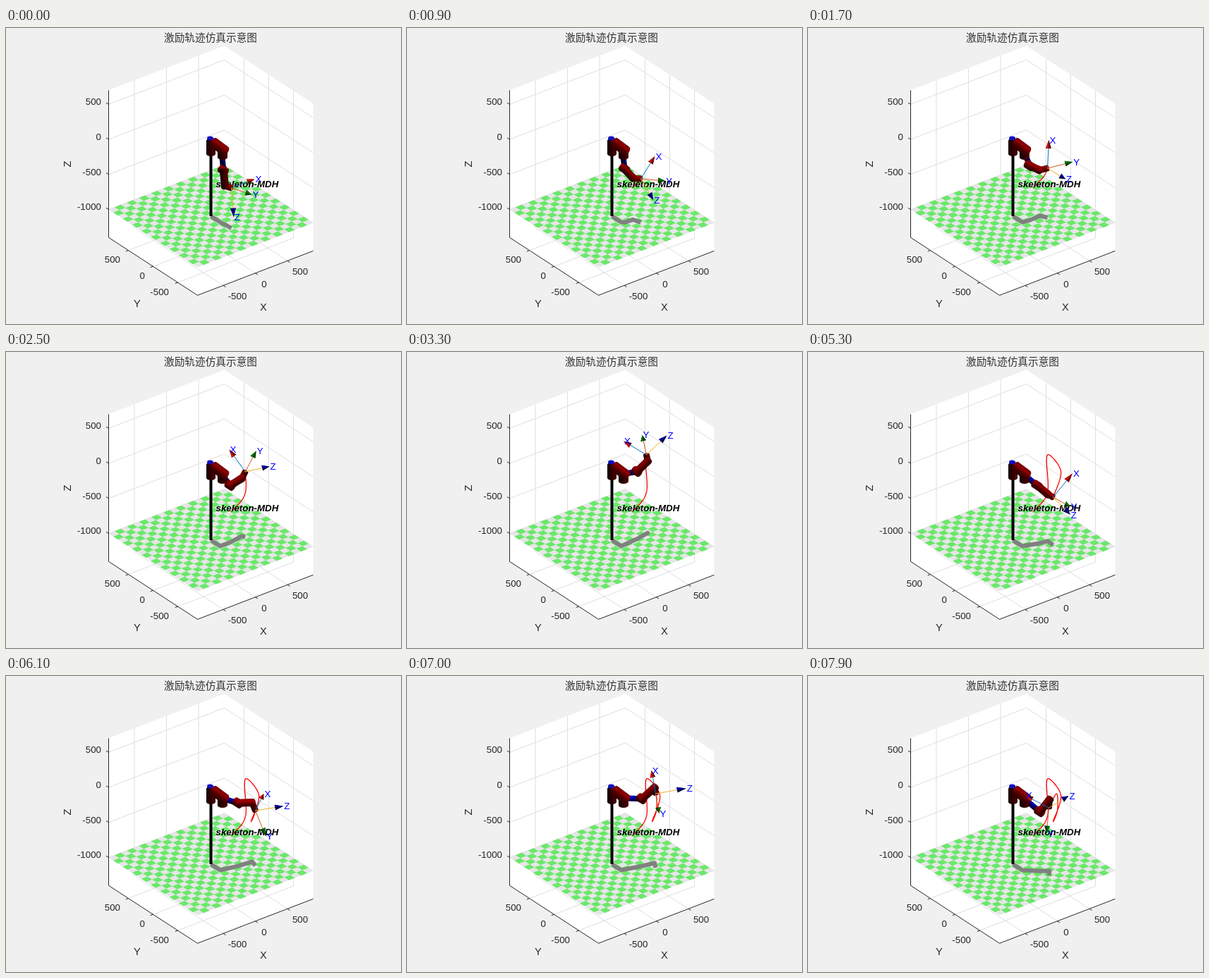
These frames come from a looping animation (560 by 420 pixels, 8000 ms). An HTML page with a canvas:

```html
<!DOCTYPE html>
<html lang="zh">
<head>
<meta charset="utf-8">
<title>Arm simulation</title>
<style>
  html, body { margin: 0; width: 100%; height: 100%; overflow: hidden; background: #f0f0f0; }
  canvas, svg { position: absolute; left: 0; top: 0; width: 560px; height: 420px; }
  text { font: 13.33px "Liberation Sans", Arial, sans-serif; fill: #262626; text-anchor: middle; }
  .end text { text-anchor: end; }
  .name text { font-size: 14.67px; }
  .name .title { font: 300 14.67px "Noto Sans CJK SC", "Noto Sans CJK", sans-serif; fill: #333; }
</style>
</head>
<body>
<canvas id="stage" width="560" height="420"></canvas>
<svg viewBox="0 0 560 420">
  <g class="name">
    <text class="title" x="290" y="19">激励轨迹仿真示意图</text>
    <text x="365" y="401">X</text>
    <text x="186" y="396">Y</text>
    <text transform="translate(92 193) rotate(-90)">Z</text>
  </g>
  <g class="end">
    <text x="135" y="109">500</text><text x="135" y="159">0</text>
    <text x="135" y="209">-500</text><text x="135" y="258">-1000</text>
    <text x="162" y="333">500</text><text x="197" y="356">0</text><text x="231" y="379">-500</text>
  </g>
  <text x="328" y="385">-500</text><text x="366" y="368">0</text><text x="417" y="350">500</text>
</svg>
<script>
const LOOP = 8000, STEP = 100;
const R = 900, LOW = -1400, HIGH = 700, FLOOR = -1000, TILES = 19;
const SHOULDER = [0, -215, 40], UPPER = 280, FORE = 210, TOOL = 120, AXIS = 44;
const ctx = document.getElementById('stage').getContext('2d');

// time, tip position, then tool heading, tilt and roll in degrees as the camera sees them
const poses = [
  [0, 20, -389, -427, -18, 46, -150],
  [1700, 317, -288, -296, 14, 33, -119],
  [3300, 423, -149, 136, 102, 49, -141],
  [4200, 480, -347, -25, 52, 41, -141],
  [5300, 319, -399, -317, -29, 51, -103],
  [6100, 414, -362, -216, -68, 27, -27],
  [7000, 375, -398, 55, -80, 50, 0],
  [7900, 182, -491, -35, -95, 33, 53]
];

// cubic Hermite through the keys
function at(keys, t) {
  const last = keys.length - 1;
  let i = 0;
  while (i < last - 1 && t >= keys[i + 1][0]) i++;
  const a = keys[i], b = keys[i + 1], span = b[0] - a[0];
  const u = Math.min(1, (t - a[0]) / span), v = 1 - u;
  const before = keys[Math.max(0, i - 1)], after = keys[Math.min(last, i + 2)];
  return a.slice(1).map((p, n) => {
    const k = n + 1, q = b[k];
    const m0 = (q - before[k]) / (b[0] - before[0]) * span;
    const m1 = (after[k] - p) / (after[0] - a[0]) * span;
    return p * v * v * (1 + 2 * u) + m0 * u * v * v + q * u * u * (3 - 2 * u) - m1 * u * u * v;
  });
}

// p + q * k
const add = (p, q, k = 1) => p.map((c, i) => c + q[i] * k);
const size = v => Math.hypot(...v) || 1;

const project = ([x, y, z]) => [
  290 + (164 * x - 126 * y) / 1800,
  167 - (63 * x + 82 * y) / 1800 - 0.0995 * z
];
const onFloor = p => project([p[0], p[1], FLOOR]);
// camera right, up and toward the viewer, turned into world directions
const toWorld = ([r, u, c]) => [
  0.793 * r + 0.304 * u - 0.527 * c,
  -0.609 * r + 0.397 * u - 0.687 * c,
  0.866 * u + 0.5 * c
];

function trace(points) {
  ctx.beginPath();
  points.forEach(p => ctx.lineTo(p[0], p[1]));
}
function fill(points, color) {
  trace(points);
  ctx.closePath();
  ctx.fillStyle = color;
  ctx.fill();
}
function line(points, color, width = 1) {
  trace(points);
  ctx.strokeStyle = color;
  ctx.lineWidth = width;
  ctx.stroke();
}
const space = points => points.map(project);
const square = (x, y, s) => space([[x, y, FLOOR], [x + s, y, FLOOR], [x + s, y + s, FLOOR], [x, y + s, FLOOR]]);

function drawAxes() {
  fill(space([[-R, R, HIGH], [R, R, HIGH], [R, -R, HIGH], [R, -R, LOW], [-R, -R, LOW], [-R, R, LOW]]), '#fff');
  const grid = '#dedede', ink = '#262626';
  for (const v of [-500, 0, 500]) {
    line(space([[v, R, HIGH], [v, R, LOW], [v, -R, LOW]]), grid);
    line(space([[R, v, HIGH], [R, v, LOW], [-R, v, LOW]]), grid);
  }
  for (const z of [-1000, -500, 0, 500]) line(space([[-R, R, z], [R, R, z], [R, -R, z]]), grid);

  fill(square(-R, -R, 2 * R), '#e6e6e6');
  const s = 2 * R / TILES;
  for (let i = 0; i < TILES; i++) {
    for (let j = 1 - i % 2; j < TILES; j += 2) fill(square(i * s - R, j * s - R, s), '#6ae86a');
  }

  line(space([[-R, R, HIGH], [-R, R, LOW], [-R, -R, LOW], [R, -R, LOW]]), ink);
  const tick = (p, dx, dy) => line([p, [p[0] + dx, p[1] + dy]], ink);
  for (const v of [-500, 0, 500]) {
    tick(project([v, -R, LOW]), 3.4, 2.2);
    tick(project([-R, v, LOW]), -3.7, 1.4);
  }
  for (const z of [-1000, -500, 0, 500]) tick(project([-R, R, z]), -3.5, -2.2);
}

// shaded cylinder lit from above
function tube(p, q, width, blue) {
  [p, q] = space([p, q]);
  if (q[0] < p[0]) [p, q] = [q, p];
  const dx = q[0] - p[0], dy = q[1] - p[1], len = Math.hypot(dx, dy), h = width / 2;
  const peak = 70 + 95 * dx / (len || 1);
  const tone = k => blue ? `rgb(0,0,${peak * k * 1.2})` : `rgb(${peak * k},0,0)`;
  ctx.save();
  ctx.translate(p[0], p[1]);
  ctx.rotate(Math.atan2(dy, dx));
  const shade = ctx.createLinearGradient(0, -h, 0, h);
  shade.addColorStop(0, tone(0.75));
  shade.addColorStop(0.25, tone(1));
  shade.addColorStop(0.65, tone(0.5));
  shade.addColorStop(1, tone(0.3));
  ctx.fillStyle = shade;
  ctx.beginPath();
  ctx.ellipse(0, 0, h * 0.55, h, 0, Math.PI / 2, Math.PI * 1.5);
  ctx.ellipse(len, 0, h * 0.55, h, 0, -Math.PI / 2, Math.PI / 2);
  ctx.fill();
  ctx.restore();
}

// tool axes X, Y, Z in camera directions
function toolAxes(angles) {
  const [a, t, r] = angles.map(d => d * Math.PI / 180);
  const { sin, cos } = Math;
  const e1 = [-sin(a), cos(a), 0];
  const e2 = [-sin(t) * cos(a), -sin(t) * sin(a), cos(t)];
  const mix = (k1, k2) => add(e1.map(c => c * k1), e2, k2);
  return [mix(-sin(r), cos(r)), [cos(t) * cos(a), cos(t) * sin(a), sin(t)], mix(cos(r), sin(r))];
}

// two-link reach from the shoulder, the elbow hanging down
function findElbow(wrist) {
  const reach = add(wrist, SHOULDER, -1), far = size(reach);
  const d = Math.min(far, UPPER + FORE), dir = reach.map(c => c / far);
  const along = (UPPER ** 2 - FORE ** 2 + d * d) / (2 * d);
  const sag = Math.sqrt(Math.max(0, UPPER ** 2 - along ** 2));
  const down = add([0, 0, -1], dir, dir[2]);
  return add(add(SHOULDER, dir, along), down, sag / size(down));
}

function drawArm(elbow, wrist, tip) {
  line(space([[0, 0, -110], [0, 0, FLOOR]]), '#000', 4);
  tube([0, 0, 75], [0, 0, -110], 13);
  const upper = add(elbow, SHOULDER, -1), fore = add(wrist, elbow, -1);
  tube(SHOULDER, elbow, 8, true);
  tube(wrist, tip, 9);
  tube(add(elbow, upper, -0.12), elbow, 10);
  tube(add(elbow, [0, 60, 0]), add(elbow, [0, -50, 0]), 12);
  tube(elbow, wrist, 11);
  tube(add(wrist, fore, -0.15), add(wrist, fore, 0.1), 11);
  tube([0, -235, 60], [0, -235, -50], 14);
  tube([0, -50, 75], [0, -290, 60], 15);
  ctx.beginPath();
  ctx.ellipse(289, 156, 4.5, 3, 0, 0, 7);
  ctx.fillStyle = '#1010c0';
  ctx.fill();
}

const looks = [
  ['X', '#0072bd', '#c81818', '#600000'],
  ['Y', '#d95319', '#087008', '#003c00'],
  ['Z', '#edb120', '#0000a0', '#000048']
];

function drawTool(axes, tip) {
  const o = project(tip);
  ctx.font = '13.33px "Liberation Sans", Arial, sans-serif';
  ctx.textBaseline = 'middle';
  looks.forEach(([name, stroke, light, dark], i) => {
    const d = [AXIS * axes[i][0], -AXIS * axes[i][1]], n = size(d);
    const end = add(o, d), foot = add(o, d, 0.7), side = [-d[1] / n, d[0] / n];
    line([o, foot], stroke);
    fill([end, add(foot, side, 4), add(foot, side, -4)], dark);
    fill([end, foot, add(foot, side, -4)], light);
    ctx.fillStyle = '#00f';
    ctx.fillText(name, end[0] + 1, end[1] + 1);
  });
}

function draw(t) {
  const pose = at(poses, t), tip = pose.slice(0, 3), axes = toolAxes(pose.slice(3));
  const wrist = add(tip, toWorld(axes[1]), -TOOL), elbow = findElbow(wrist);
  ctx.setTransform(1, 0, 0, 1, 0, 0);
  ctx.fillStyle = '#f0f0f0';
  ctx.fillRect(0, 0, 560, 420);
  ctx.translate(0.5, 0.5);
  ctx.lineJoin = 'round';
  drawAxes();
  line([[0, 0], [0, -186], elbow, wrist, tip].map(onFloor), '#808080', 6);
  const path = [];
  for (let k = 0; k <= t; k += 50) path.push(project(at(poses, k)));
  line(path, '#f00', 1.3);
  ctx.font = 'italic bold 13.33px "Liberation Sans", Arial, sans-serif';
  ctx.textBaseline = 'alphabetic';
  ctx.fillStyle = '#000';
  ctx.fillText('skeleton-MDH', 297, 225);
  drawArm(elbow, wrist, tip);
  drawTool(axes, tip);
}

let shown = -1;
function tick(now) {
  const t = Math.floor(now % LOOP / STEP) * STEP;
  if (t !== shown) draw(shown = t);
  requestAnimationFrame(tick);
}
draw(0);
requestAnimationFrame(() => tick(performance.now()));
</script>
</body>
</html>
```
